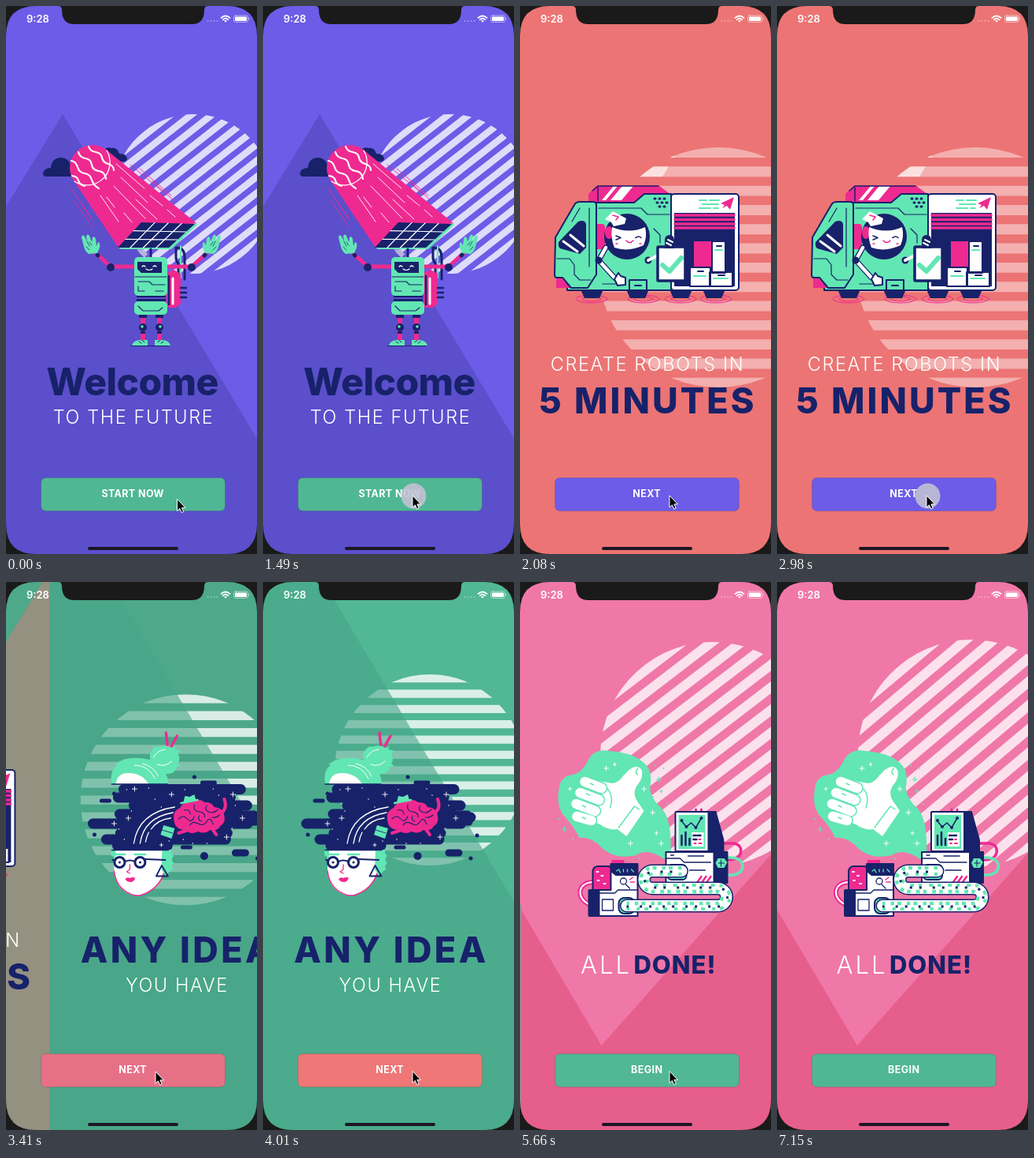
An HTML page for the animation above (8650 ms loop, 319 by 694 pixels).

```html
<!DOCTYPE html>
<html lang="en">
<head>
<meta charset="utf-8">
<title>Onboarding</title>
<style>
html, body { margin: 0; height: 100%; overflow: hidden; background: #1a1a1a }
svg { display: block; width: 100vw; height: 100vh }
text { font-family: Inter, sans-serif; text-anchor: middle; fill: #fff }
.big { font-weight: 800; fill: #17226a }
.thin { font-weight: 300; font-size: 23.5px; letter-spacing: 1.6px }
.n { fill: #17226a } .p { fill: #ee2a90 } .m { fill: #62e6b3 } .w { fill: #fff }
.ln, .lp, .lm, .lw { fill: none; stroke-linecap: round; stroke-linejoin: round }
.ln { stroke: #17226a } .lp { stroke: #ee2a90 } .lm { stroke: #62e6b3 } .lw { stroke: #fff }
.o { stroke: #17226a; stroke-width: 2; stroke-linejoin: round }
</style>
</head>
<body>
<svg viewBox="0 0 319 694">
<defs>
  <clipPath id="disc"><circle r="1"/></clipPath>
  <g id="limb">
    <path class="lp" stroke-width="5" d="M165 330H133L113 312"/>
    <circle class="n" cx="133" cy="331" r="5"/>
    <path class="ln" stroke-width="5" d="M116 315l1 1"/>
    <path class="m" d="M116 313l-11 1q-5-4-6-9l-3-12q1-5 4-1l3 6-1-7q2-3 4 0l3 8 1-6q3-2 4 2l1 9 2-5q3 0 2 7z"/>
    <path class="ln" stroke-width=".7" d="M103 298l3 6M106 299l3 4M102 305l4 4"/>
    <path class="lp" stroke-width="6" stroke-linecap="butt" d="M174 390v34"/>
    <path class="n" d="M169 389h10v6h-10zM171 412h6v3h-6z"/>
    <circle class="n" cx="174" cy="407" r="5"/>
    <circle class="m" cx="173" cy="406" r="1.8"/>
    <path class="m" d="M160 430q1-6 10-7h10v7z"/>
    <path class="ln" stroke-width="1" d="M169 425l3 2M173 423.500l3 2"/>
  </g>
  <path id="wheel" class="n" d="M77 359h29l-5 11H82z"/>
  <g id="ripple" class="lp"><ellipse cx="91" cy="371" rx="20" ry="5"/><ellipse cx="91" cy="371" rx="12" ry="3"/></g>
</defs>

<rect id="backdrop" width="319" height="694"/>
<g id="sun"><path id="stripes" class="w" opacity=".78" clip-path="url(#disc)"/></g>

<g class="page">
  <path fill="#33348a" opacity=".3" d="M0 254L72 137 322 553V694H0z"/>
  <path class="n" d="M50 216q-5-2-2-7 3-4 9-4 1-12 12-13 10 0 13 9 4-2 7 1 2 2 1 4 6 1 7 5 0 4-4 5zM126 181q4-3 8-1 7-2 10 7 9 0 10 6 0 4-5 4h-13z"/>
  <path class="p" d="M128.600 183L242 275 207 306H143L86.500 222z"/>
  <circle class="p" cx="110" cy="205" r="29"/>
  <path class="lw" stroke-width="1.300" d="M128 183A29 29 0 0 1 87 222"/>
  <path class="lw" stroke-width="2.200" d="M105 178q2 6 9 7t8 7 8 8 7 8M92 185q2 7 9 8t8 8 9 8 9 10M83 196q6 1 8 8t9 8 9 8 9 11M84 215q7 1 8 6t8 7"/>
  <path class="lw" stroke-width=".9" d="M140 200l36 31M146 217l34 32M120 240l23 33M137 228l40 41M165 245l27 25M128 242l10 13M183 240l16 13M150 262l10 12M205 258l10 9"/>
  <path class="lp" stroke-width=".9" d="M158 201l46 38M170 206l40 34M186 222l28 25M82 230l27 39M86 246l24 34M95 249l14 21"/>
  <path class="m" d="M240 275l3 2-33 31h-64l-3-2z"/>
  <path class="n" d="M172 274L240 276 207 306H142z"/>
  <path class="lw" stroke-width="1.200" d="M162 284.700l67 1.300M152 295.300l66 .700M189 274.400L158 306M206 275l-31.500 31M223 275.500L191 306"/>
  <path fill="#b8b4e0" d="M169 312l5-4 6 6-4 5z"/>
  <path class="ln" stroke-width="3" d="M184 308v11M216 306v12q0 5 3 8v20M217 306q10 0 10 12v28"/>
  <path class="lm" stroke-width="2" d="M222 304v40"/>
  <use href="#limb"/><use href="#limb" transform="translate(369) scale(-1 1)"/>
  <path class="p" d="M204 338l9-4 9 5v38l-6 5h-12z"/>
  <path class="lw" stroke-width="3" d="M212 345v32"/>
  <path class="ln" stroke-width="2.500" d="M207 342v36M222 357h7M222 363h7M222 369h7"/>
  <rect class="m" x="163" y="318" width="42" height="49" rx="5"/>
  <rect class="m" x="163" y="374" width="42" height="17" rx="5"/>
  <path class="n" d="M167 324h31v14h-26l-5-5zM166 367h37v2h-37zM166 371h37v3h-37z"/>
  <path class="lw" stroke-width="1.200" d="M173 330q2-2 4 0M187 330q2-2 4 0M178 333q4 3 8 0"/>
  <path class="ln" stroke-width="1.100" d="M164 343h40M168 349h14l4 4h16M168 355v6h8M190 361h10M168 380l6 6h20l5-4"/>
  <path class="ln" stroke-width="1.200" d="M159 430.500h48"/>
  <text class="big" x="160.500" y="493" font-size="48" letter-spacing="-.6">Welcome</text>
  <text class="thin" x="162" y="529">TO THE FUTURE</text>
</g>

<g class="page">
  <path fill="#ec7373" opacity=".45" d="M0 513L313 0h9v694H0z"/>
  <use href="#ripple"/><use href="#ripple" x="66"/><use href="#ripple" x="113"/><use href="#ripple" x="158"/>
  <use href="#wheel"/><use href="#wheel" x="58"/><use href="#wheel" x="113"/><use href="#wheel" x="155"/>
  <path class="p" d="M87 250V238l11-11h78l16 12v11z"/>
  <path class="w" d="M104 246l15-18h5l-15 18zM115 246l15-18h14l-15 18z"/>
  <path class="ln" stroke-width="1.500" d="M99 247V230M92 234l7-6h77"/>
  <path class="m o" d="M77 249h68l13-11h34v122H60V300z"/>
  <path class="ln" stroke-width="3" d="M171 244h1M177 244h1M183 244h1M174 249h1M180 249h1M186 249h1M177 254h1M183 254h1"/>
  <path class="ln" stroke-width="1.200" d="M100 256h54l8 8h28M105 352h28M170 282l8 8v10"/>
  <rect class="p" x="94" y="276" width="14" height="32" rx="4"/>
  <path class="p" d="M46 338l18 19H46z"/>
  <path class="m o" d="M45 293l24-41q2-4 7-4h17q4 0 4 4v88l-11 17H65L54 344h-7q-3 0-3-4z"/>
  <path class="n" d="M49 299l25-26q9-3 10 4v29l-8 8-25-7q-3-3-2-8z"/>
  <path class="lw" stroke-width="3" d="M55 298l18 13M64 290l17 14"/>
  <path class="ln" stroke-width="1.200" d="M47 320h16l6 8v12l7 7h14M76 256l-10 17M88 256v74"/>
  <rect class="m o" x="139" y="347" width="22" height="13"/>
  <path class="ln" stroke-width="2" d="M146 354h8"/>
  <rect class="w o" x="192" y="238" width="86" height="122" rx="4"/>
  <path class="lm" stroke-width="2" d="M228 246h9M241 246h12M232 251h20M228 256h14M246 256h6"/>
  <path class="p" d="M255 250l17-8-5 16-4-5-6 3 3-4z"/>
  <path class="n" d="M196 262h77v93h-77z"/>
  <path class="lp" stroke-width="3.600" stroke-linecap="butt" d="M197 265h75M197 270.500h75M197 276h75M197 281h75"/>
  <path class="p" d="M221 298h24v34h-24z"/>
  <g class="w o" stroke-width="1"><path d="M244 298h17v40h-17zM216 331h26v24h-26zM241 337h29v18h-29z"/></g>
  <path class="lm" stroke-width="2" d="M248 309h9M221 342h15M246 345h18"/>
  <path class="ln" stroke-width="2" d="M250 304h6M226 336h7M252 341h8"/>
  <circle class="n" cx="136" cy="292" r="29"/>
  <ellipse class="p" cx="113" cy="287" rx="5" ry="8"/>
  <path class="w" d="M117 280q22 9 42 0 3 12-2 23-19 9-37 3-5-12-3-26zM108 270l10-10 17 9-2 7-14 3-3-5z"/>
  <path class="lp" stroke-width="1.600" d="M118 265l7 2-3 4M135 297q4 5 9 0M122 301h2M152 301h2"/>
  <path class="ln" stroke-width="1.600" d="M122 291l6 2.500-6 2.500M147 293.500q4-3 7 0"/>
  <path class="ln" stroke-width="7" d="M100 322l9-16M100 322l20 22"/>
  <path class="lw" stroke-width="4.500" d="M100 322l9-16M100 322l20 22"/>
  <circle class="n" cx="100" cy="322" r="4.500"/><circle class="n" cx="163" cy="322" r="4.500"/>
  <path class="w o" stroke-width="1" d="M120 346l5-8 3 4 6 2v9l-10 1z"/>
  <path class="lw" stroke-width="4" d="M163 322l12-6"/>
  <rect class="w o" style="stroke-width:3.500" x="175" y="305" width="35" height="43" rx="1"/>
  <path class="n" d="M184 307v-10q0-7 6-7t6 7v10z"/>
  <path class="lw" stroke-width="2" d="M186 300l6 3M188 296l6 3"/>
  <path class="lm" stroke-width="6" stroke-linecap="butt" stroke-linejoin="miter" d="M181 328l9 8 15-17"/>
  <text class="thin" x="162" y="462">CREATE ROBOTS IN</text>
  <text class="big" x="162.500" y="515.500" font-size="45" letter-spacing="3.100">5 MINUTES</text>
</g>

<g class="page">
  <path fill="#46a587" opacity=".6" d="M0 0h77L322 410V694H0z"/>
  <g class="ln">
    <path stroke-width="13" d="M94 262.500H243M87 273H230M107 283H251M89 294H240M55 306H252M110 298H264M90 318H226M72 326H224M86 334H150"/>
    <path stroke-width="9" d="M240 304H262M190 294H260M236 343h13"/>
    <path stroke-width="5" d="M66 277h10M82 268h.100M194 254h16M184 247h.100M57 320h.100M169 336h10M272 321h.100M264 350h.100"/>
    <path stroke-width="10" d="M196.500 347h.100"/>
  </g>
  <g class="lw">
    <path stroke-width="1.500" d="M98 263h0M134 275h0M104 290h0M126 261h0M172 263h0M88 313h0M208 262h0M95 326h0M236 283h0M170 326h0M200 331h0M232 312h0M152 328h0M215 270h0M142 285h0M182 331h0"/>
    <path stroke-width=".9" d="M105 262h6m-3-3v6M152 269h6m-3-3v6M230 269h6m-3-3v6M97 299h6m-3-3v6M79 306h6m-3-3v6M222 323h6m-3-3v6M242 299h6m-3-3v6M140 333h4m-2-2v4"/>
    <path stroke-width="1.300" d="M107 331q6-39 52-46M115 331q5-33 42-39M129 313q8-12 25-14M122 329q1-6 4-12"/>
  </g>
  <path class="lp" stroke-width="4" d="M215 294q12-5 7-19M176 314l-12 4M206 312l6 8"/>
  <path class="p" d="M158 301q-2-11 8-15 4-9 15-8 9-5 16 1 9-1 12 6 12 1 13 11 2 9-5 13-3 7-13 5-7 6-15 2-10 5-16-2-14 0-15-13z"/>
  <path class="ln" stroke-width="1.100" d="M164 300q6-6 11 0t9-3M171 289q7-2 8 5M184 282q-2 8 6 9t7 7M200 283q-4 5 2 8t12-3M178 308q4-6 11-2t11-3 8 4M206 298q6 1 10-3M190 296q-2 6 3 7"/>
  <path class="lm" stroke-width="2.500" d="M167 280l21-4"/>
  <path class="m" d="M170 279l2-8 6 1 6-3 2 7z"/>
  <path class="m" d="M145 308l14 4-4 13-14-5z"/>
  <path class="ln" stroke-width=".9" d="M143 314l13 4M150 309l2-4 4 1-1 4"/>
  <path class="lp" stroke-width="3.500" d="M148 191l2 18M162 195l-9 16"/>
  <path class="m" d="M79 256q-3-17 7-24l-3-1q12-10 32-8l13 2q-3-11 8-17l2 1q10-4 18 1l5-2-2 4 8 2-4 3q4 8 0 13l4 3-5 1q-3 10-14 9 3 6 3 13z"/>
  <path class="w" d="M84 256q2-14 15-14 18-1 27 14z"/>
  <path class="lw" stroke-width="1" d="M108 232q18 0 26 17M118 230q14 3 20 16M132 222q5-9 15-10M137 231q10 4 18-4"/>
  <path class="ln" stroke-width="1.500" d="M79 256h71"/>
  <path class="w" d="M82 340v28q3 23 25 29h8q26-8 31-33v-24z"/>
  <path class="lp" stroke-width="1.500" d="M82 366q3 25 27 31h6q23-7 30-28"/>
  <path class="m" d="M143 339h13q-3 4 2 8-5 4 0 9-5 3-1 8-6 2-9 9l-6-9zM78 340h6v10l-6-4z"/>
  <path class="ln" stroke-width="1.500" d="M79 339.500h72"/>
  <path class="lm" stroke-width="2.500" d="M84 345h12M108 345h14"/>
  <g class="ln" stroke-width="3"><circle class="w" cx="89" cy="355" r="6.500"/><circle class="w" cx="115" cy="355" r="6.500"/><path d="M89 355h.100M115 355h.100"/></g>
  <path class="ln" stroke-width="2" d="M96 354q6-3 12 0M122 351l25 1M80 352h3"/>
  <path class="lp" stroke-width="1.300" d="M102 358v6l-4 3 4 2"/>
  <path class="p" d="M96 376q3-3 6-1 4-2 7 0-2 5-6 5-5 0-7-4z"/>
  <path class="ln" stroke-width="1.800" d="M142.500 359l8 13.500h-15z"/>
  <text class="big" x="163" y="482" font-size="45" letter-spacing="3.400">ANY IDEA</text>
  <text class="thin" x="162" y="519">YOU HAVE</text>
</g>

<g class="page">
  <path fill="#e65e8c" d="M0 415L102 587 322 340V694H0z"/>
  <path class="m" d="M48 262Q50 245 66 244 76 242 84 228 92 210 112 214 140 216 152 226 168 236 164 258 162 272 178 286 192 300 190 347L182 351Q160 336 146 346 120 352 104 338 90 322 74 324 66 308 56 298 44 286 48 262z"/>
  <path class="lm" stroke-width="1.200" d="M172 250h6m-3-3v6M176 265h4m-2-2v4M52 313h6m-3-3v6"/>
  <path class="lm" stroke-width="2" d="M48 300h0M66 326h0M181 236h0M168 272h0M186 281h0M170 232h0M51 254h0M150 350h0"/>
  <path class="lw" stroke-width="1" d="M105 236h6m-3-3v6M117 231h4m-2-2v4M153 262h6m-3-3v6M164 292h6m-3-3v6M175 331h6m-3-3v6M136 331h6m-3-3v6M60 262h4m-2-2v4M170 318h4m-2-2v4"/>
  <path class="w" d="M82 249L116 255Q124 254 130 245L137 238Q148 230 153 238 156 248 147 258 140 269 150 281L156 290 134 322 122 313Q112 315 100 307L78 297z"/>
  <g class="lm" stroke-width="15.500"><path id="fingers" d="M81 253l21 8M75 267l24 9M70 281l24 9M71 297l18 5"/></g>
  <use href="#fingers" class="lw" stroke-width="12.500"/>
  <path class="lm" stroke-width="1.500" d="M88 255l4 2M83 268l4 2M78 283l4 2M78 298l4 2M110 262q8 10 3 24M124 311l20-27 6 4M148 236q-4 6 0 8"/>

  <path class="lp" stroke-width="3.500" d="M252 331h18q11 2 9 12-2 9-16 9"/>
  <path class="lm" stroke-width="3.500" d="M260 371h10q13-3 11-14-3-9-19-8"/>
  <path class="n o" d="M238 291h9l10 36v15h-19z"/>
  <path class="lp" stroke-width="3" d="M222 290v-2M229 290v-2"/>
  <rect class="w o" x="196" y="291" width="42" height="50" rx="1"/>
  <path class="m" d="M200 295h34v43h-34z"/>
  <path class="w" d="M217 317h15v18h-15z"/>
  <path class="ln" stroke-width="1.500" d="M204 303l6 7 6-5 6 6 7-12"/>
  <path class="ln" stroke-width="4" d="M204 302h0M210 310h0M222 311h0M229 299h0"/>
  <path class="ln" stroke-width="2.500" stroke-linecap="butt" d="M204 333v-12M209 333v-16M214 333v-8M219 321h3M224 321h4M219 326h4"/>
  <path class="lp" stroke-width="2" d="M220 331h2M226 331h3M226 326h2"/>
  <path class="n o" d="M245 342h17v39h-17z"/>
  <path class="m" d="M250 350h8l4 5-4 7h-8l-3-6z"/>
  <path class="ln" stroke-width="1" d="M251 356h7M254 352v8"/>
  <path class="w o" d="M184 342h61v39h-61z"/>
  <path class="ln" stroke-width="1.300" d="M184 350h18l5 5h34M212 347h20M214 365h20M190 346h4"/>
  <path class="lp" stroke-width="2.500" stroke-linecap="butt" d="M224 380l5-7M230 380l5-7M236 380l5-7"/>
  <rect class="m o" x="186" y="358" width="24" height="19" rx="5"/>

  <path class="lp" stroke-width="6" d="M94 408h-8q-12-6-11-17 3-11 18-11"/>
  <path class="lw" stroke-width="2" d="M94 408h-8q-12-6-11-17 3-11 18-11"/>
  <rect class="n" x="85" y="389" width="20" height="35" rx="2"/>
  <path class="p o" d="M91 366q1-6 7-6h14l6 6v24H91z"/>
  <path class="lw" stroke-width="2" d="M96 367h2M102 372h2M97 378h2M105 382h2"/>
  <path class="p" d="M115 352h16v6h-16z"/>
  <path class="w o" d="M114 357h34v66H99v-33h15z"/>
  <path class="n" d="M114 357h34v15h-28l-6-5z"/>
  <path class="lm" stroke-width="1.300" d="M121 366l3-2 2 4M130 367v-3M135 367v-3M140 364l3 3"/>
  <path class="ln" stroke-width="1.300" d="M103 402h14v14h-14zM99 394h20l4-4h24M126 379a4 4 0 1 0 8 0 4 4 0 1 0-8 0M90 394v24M133 383l5 5"/>
  <path class="lp" stroke-width="1.500" d="M138 377l4-3M139 380h5"/>
  <rect class="m o" x="124" y="400" width="20" height="20" rx="7"/>
  <g fill="none">
    <path id="belt" d="M204 366H167a11 11 0 0 0 0 22H250a11 11 0 0 1 0 22H134" class="ln" stroke-width="17"/>
    <path d="M204 366H167a11 11 0 0 0 0 22H250a11 11 0 0 1 0 22H134" class="lw" stroke-width="14"/>
    <path d="M204 362H167a15 15 0 0 0 0 30H250a8 8 0 0 1 0 15H134" stroke="#62e6b3" stroke-width="4.500" stroke-dasharray="4.500 7 5 4"/>
    <path d="M204 370H167a7 7 0 0 0 0 14H250a15 15 0 0 1 0 30H134" stroke="#62e6b3" stroke-width="4" stroke-dasharray="4 9 5 6"/>
    <path d="M204 367H167a10 10 0 0 0 0 20H250a12 12 0 0 1 0 24H134" stroke="#17226a" stroke-width="3" stroke-dasharray="3 14 3 9" stroke-dashoffset="5"/>
  </g>
  <text x="108" y="496" font-size="31" font-weight="300" letter-spacing="3">ALL</text>
  <text class="big" x="195.500" y="496" font-size="31" letter-spacing="1">DONE!</text>
</g>

<rect id="button" x="44.500" y="597.500" width="234" height="42" rx="6" stroke="#000" stroke-opacity=".12"/>
<text id="label" x="161.200" y="622" font-size="12.500" font-weight="700" letter-spacing=".4"></text>
<circle id="touch" cx="191.500" cy="620.500" r="16" fill="#c4c2d4" opacity=".88"/>

<text x="40.500" y="21" font-size="13" font-weight="600">9:28</text>
<path class="lw" stroke-width="2" opacity=".4" d="M256.500 19h0M260.500 19h0M264.500 19h0M268.500 19h0"/>
<path class="lw" stroke-width="1.800" stroke-linecap="butt" d="M273.500 15q5.500-5 11 0M275.700 17.300q3.300-3 6.600 0"/>
<path class="w" d="M277 18.600q2-1.400 4 0l-2 2.200z"/>
<rect class="lw" opacity=".5" x="289.500" y="12" width="18" height="8.500" rx="2.500"/>
<rect class="w" x="291" y="13.500" width="15" height="5.500" rx="1.200"/>
<path class="w" opacity=".6" d="M308.500 14.500q2 1.700 0 3.500z"/>

<path fill="#1a1a1a" fill-rule="evenodd" d="M0 0H319V694H0zM38 0Q0 0 0 38V656Q0 694 38 694H281Q319 694 319 656V38Q319 0 281 0z"/>
<path fill="#1a1a1a" d="M66 0q5 0 5 5 0 18 16 18H236q16 0 16-18 0-5 5-5z"/>
<rect x="104" y="685" width="115" height="4" rx="2" fill="#1c1626"/>
<path id="cursor" fill="#000" stroke="#fff" d="M.5.500V15.500L3.900 12.400 6.200 17.600 8.700 16.500 6.400 11.400H11z"/>
</svg>

<script>
const LOOP = 8650, TICK = 149, SLIDE = 580, PITCH = 322;
const SLIDES = [1500, 3000, 5105];
const TOUCHES = [10, 20, 34];
const LABELS = ['START NOW', 'NEXT', 'NEXT', 'BEGIN'];
// Colour of each screen, with the tone passed on the way to the next one
const MIDWAY = [.5, .83, .42];
const BACKDROP = [[108, 92, 231], [182, 104, 172], [236, 116, 116], [77, 169, 138], [81, 183, 149], [106, 158, 153], [240, 120, 168]];
const BUTTON = [[80, 183, 148], [70, 139, 190], [108, 92, 231], [230, 113, 135], [239, 119, 119], [147, 144, 128], [80, 183, 148]];
// Striped disc: x, y, radius, angle
const DISC = [[238, 238, 101, -38], [252, 331, 152, 0], [212, 238, 121, 0], [247, 217, 144, -40]];

const $ = id => document.getElementById(id);
const pages = [...document.querySelectorAll('.page')];
const clamp = v => Math.min(1, Math.max(0, v));
const mix = (a, b, p) => a.map((v, i) => v + (b[i] - v) * p);

function tone(stops, i, p) {
  const m = MIDWAY[i], k = 2 * i;
  const c = p < m ? mix(stops[k], stops[k + 1], p / m) : mix(stops[k + 1], stops[k + 2], (p - m) / (1 - m));
  return `rgb(${c.map(Math.round)})`;
}

$('stripes').setAttribute('d', Array.from({ length: 13 }, (_, k) => `M-1 ${-1 + k * .16}h2v.085h-2z`).join(''));

function draw() {
  const tick = Math.floor((performance.now() % LOOP + 25) / TICK);
  const now = tick * TICK;
  const i = Math.max(0, SLIDES.filter(s => s <= now).length - 1);
  const u = clamp((now - SLIDES[i]) / SLIDE);
  const p = u * u * (3 - 2 * u);

  $('backdrop').setAttribute('fill', tone(BACKDROP, i, p));
  $('button').setAttribute('fill', tone(BUTTON, i, p));
  $('label').textContent = LABELS[u > .2 ? i + 1 : i];
  pages.forEach((page, k) => page.setAttribute('transform', `translate(${(k - i - p) * PITCH})`));

  const [x, y, r, angle] = mix(DISC[i], DISC[i + 1], u ** 1.7);
  $('sun').setAttribute('transform', `translate(${x} ${y}) rotate(${angle}) scale(${r})`);

  const move = clamp(tick / 8), glide = move * move * (3 - 2 * move);
  const [cx, cy] = mix([217, 624], [189.5, tick < 27 ? 619.5 : 619], glide);
  $('cursor').setAttribute('transform', `translate(${cx} ${cy})`);
  $('cursor').style.display = tick < 48 ? '' : 'none';
  $('touch').style.display = TOUCHES.includes(tick) ? '' : 'none';
  requestAnimationFrame(draw);
}
draw();
</script>
</body>
</html>
```
